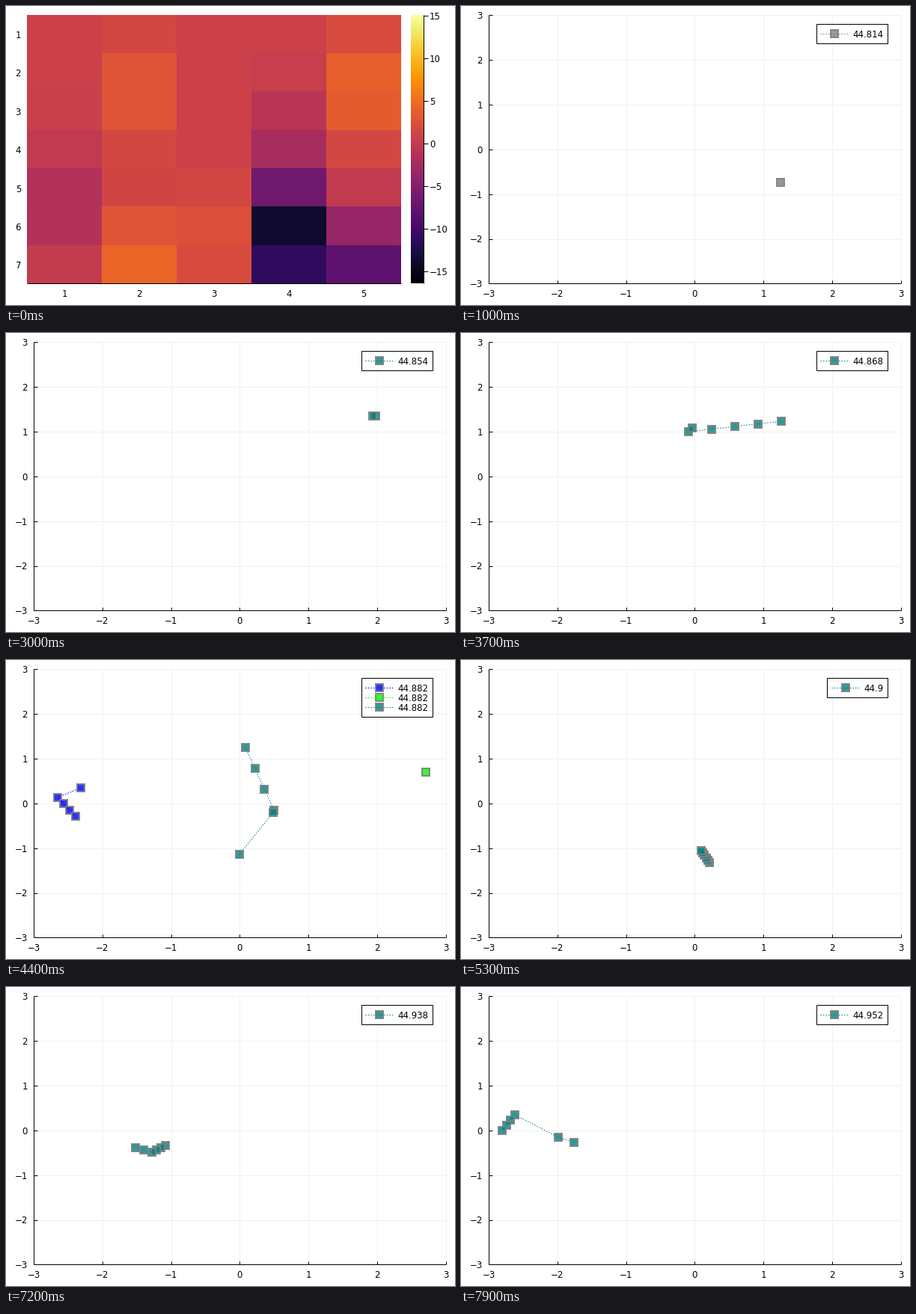
Recreate the animation shown at these times as a matplotlib script. Size 600 by 400 pixels, loop 8000 ms.

```python
import matplotlib.pyplot as plt
import numpy as np
from matplotlib.animation import FuncAnimation
from matplotlib.colors import to_rgba
from matplotlib.patches import Rectangle

W, H, DPI = 600, 400, 100
FRAMES, INTERVAL = 80, 100
PX = 72 / DPI              # points per pixel
FONT = 11.7 * PX
CHAR = 11.7 * 0.636        # digit width in pixels
TRAIL = 6

# Heatmap: a flat level plus bumps given as column, row, height.
V_MIN, V_MAX, LEVEL = -16.4, 15.1, 0.7
BUMPS = [(4, 6.3, -15), (4, 3.7, -2), (5, 7.3, -8.5), (5, 2.4, 3.4),
         (2, 2.5, 2.5), (2, 7, 3.5), (1, 5.5, -2.4), (3, 6.2, 2.2)]

# Tracks: colour, first and last step shown, key points (step, x, y).
TRACKS = [
    ("gray", 10, 16, [(10, 427, 236), (11, 431, 231)]),
    ("teal", 17, 25, [(17, 335, 289), (21, 291, 228), (25, 392, 178)]),
    ("blue", 26, 28, [(26, 174, 226), (28, 190, 242)]),
    ("blue", 44, 44, [(40, 100, 171), (41, 69, 184), (44, 93, 209)]),
    ("lime", 44, 44, [(44, 561, 150)]),
    ("lime", 70, 70, [(70, 548, 141)]),
    ("teal", 29, 79, [
        (29, 494, 111), (30, 490, 111), (36, 304, 132), (39, 320, 117),
        (42, 358, 201), (43, 357, 204), (44, 312, 260), (47, 334, 274),
        (53, 321, 255), (57, 329, 254), (59, 354, 233), (60, 256, 187),
        (63, 236, 201), (70, 195, 221), (74, 151, 208), (75, 130, 201),
        (76, 72, 171), (79, 55, 192)]),
]

fig = plt.figure(figsize=(W / DPI, H / DPI), dpi=DPI, facecolor="white")
ax = fig.add_axes([0, 0, 1, 1])


def line(x, y, color="black", width=1.0, **kw):
    ax.plot(x, y, color=color, lw=width * PX, solid_capstyle="butt", **kw)


def dotted(x, y, color, z=2):
    line(x, y, color, 1.1, ls=(0, (1.3, 1.9)), dash_capstyle="butt", zorder=z)


def marker(x, y, color, z=2):
    ax.plot([x], [y], "s", ms=10.6 * PX, mew=2 * PX, zorder=z,
            mfc=to_rgba(color, 0.8), mec=to_rgba("gray", 0.9))


def label(x, y, text, ha="center"):
    ax.text(x, y, text, ha=ha, va="center_baseline", fontsize=FONT,
            family="DejaVu Sans", color="black")


def signed(n):
    return str(n).replace("-", "\u2212")


def field():
    col, row = np.meshgrid(np.arange(1, 6), np.arange(1, 8))
    z = np.full(col.shape, LEVEL)
    for c, r, height in BUMPS:
        z += height * np.exp(-((col - c) / 0.4) ** 2 / 2 - (row - r) ** 2 / 2)
    return z


def draw_heatmap():
    style = dict(cmap="inferno", interpolation="nearest", aspect="auto")
    ax.imshow(field(), vmin=V_MIN, vmax=V_MAX,
              extent=(28, 528, 371, 12), **style)
    line([28, 528], [371, 371])
    for c in range(5):
        label(78 + 100 * c, 384, str(c + 1))
    for r in range(7):
        label(20, 38 + 51.4 * r, str(r + 1), "right")

    ax.imshow(np.linspace(1, 0, 256)[:, None],
              extent=(541, 558, 371, 12), **style)
    line([558, 558], [12, 371])
    for v in range(-15, 16, 5):
        y = 184 - 11.41 * v
        line([558, 564], [y, y])
        label(566, y, signed(v), "left")


def draw_axes():
    ticks = [(k, 312.4 + 91.83 * k, 191.7 - 59.9 * k) for k in range(-3, 4)]
    for _, x, y in ticks:
        line([x, x], [12, 371], "#f0f0f0")
        line([37, 588], [y, y], "#f0f0f0")
    line([37, 37], [12, 371])
    line([37, 588], [371, 371])
    for k, x, y in ticks:
        line([x, x], [366.5, 371])
        line([37, 42], [y, y])
        label(x, 384, signed(k))
        label(29, y, signed(k), "right")


def draw_legend(colors, text):
    left = 515.5 - (len(text) - 0.5) * CHAR
    ax.add_patch(Rectangle((left, 24), 570 - left, 13 + 13 * len(colors),
                           fc="white", ec="black", lw=PX, zorder=3))
    for k, color in enumerate(colors):
        y = 37 + 13 * k
        dotted([left + 5.5, left + 43.5], [y, y], color, 4)
        marker(left + 24.5, y, color, 4)
        label(left + 49, y, text, "left")


def trail(keys, i):
    step, x, y = np.transpose(keys)
    seen = np.arange(max(step[0], i - TRAIL + 1), i + 1)
    return np.interp(seen, step, x), np.interp(seen, step, y)


def draw_plot(i):
    draw_axes()
    shown = [(color, keys) for color, first, last, keys in TRACKS
             if first <= i <= last]
    for color, keys in shown:
        x, y = trail(keys, i)
        dotted(x, y, color)
        for px, py in zip(x, y):
            marker(px, py, color)
    value = 44.814 + 0.002 * (i - 10)
    draw_legend([color for color, _ in shown], f"{value:.5g}")


def update(i):
    ax.clear()
    ax.axis("off")
    if i < 10:
        draw_heatmap()
    else:
        draw_plot(11 if 11 <= i < 17 else i)   # holds still for a while
    ax.set_xlim(0, W)
    ax.set_ylim(H, 0)
    return []


anim = FuncAnimation(fig, update, frames=FRAMES, interval=INTERVAL,
                     init_func=lambda: [], repeat=True, repeat_delay=0,
                     blit=False)
plt.show()
```
